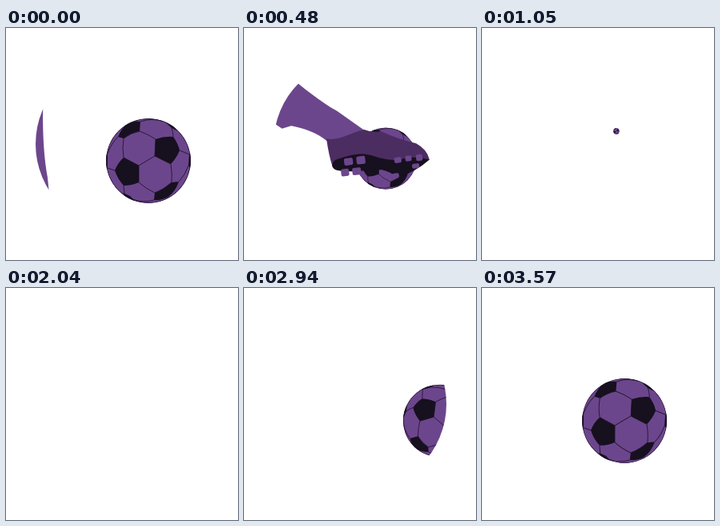
These frames come from a looping animation (290 px wide and 290 px high, 3.6 s). An HTML page:

```html
<!DOCTYPE html>
<html>
<head>
<meta charset="utf-8">
<style>
html, body { margin: 0; width: 100%; height: 100%; overflow: hidden; background: #fff; }
svg { display: block; width: 100vw; height: 100vh; }
.light { fill: #6c468c; }
.boot { fill: #4c2d61; }
.dark { fill: #17101f; }
.seam { fill: none; stroke: #2a1a38; stroke-width: 1; }
</style>
</head>
<body>
<svg viewBox="0 0 290 290">
  <clipPath id="stage"><circle cx="145" cy="145" r="108"/></clipPath>
  <clipPath id="round"><circle cx="178" cy="166" r="53"/></clipPath>
  <g clip-path="url(#stage)">
    <g id="ball"><g clip-path="url(#round)">
      <circle class="light" cx="178" cy="166" r="53"/>
      <path class="seam" d="M147 138Q156 131 167 129Q178 133 187 139L186 160L166 172L147 162Q145 150 147 138
        M186 160L206 170Q208 182 207 193Q197 202 186 206Q175 201 166 193V172
        M217 153L229 158M209 136Q209 130 207 125M136 178L127 175M147 197L148 207
        M140 136Q131 145 127 157M216 192Q224 184 228 172M168 117Q183 112 198 117M185 215Q172 219 158 214"/>
      <path class="dark" d="M187 139Q198 135 209 136Q215 144 217 153Q213 163 206 170L186 160Z
        M147 162L166 172V193Q157 197 147 197Q139 188 136 178Q140 168 147 162Z
        M140 136Q144 126 152 119Q160 116 168 117L167 129Q156 131 147 138Z
        M186 206Q197 202 207 193L216 192Q212 204 203 211Q194 216 185 215Z
        M229 158L232 154V178L228 172Z M124 158L127 157V175L124 178Z
        M196 115L207 119L215 129L207 125Z M146 206L155 210L163 218L149 213Z"/>
      <circle class="seam" cx="178" cy="166" r="52.7"/>
    </g></g>
    <g id="leg">
      <path class="light" d="M40 50L57 83C68 104 82 128 97 147L120 182L122 194H74L72 178C64 163 50 151 37 143L25 142L18 132L-10 125V50Z"/>
      <path class="boot" d="M72 174C84 183 104 178 120 181Q127 188 139 191Q154 207 174 221Q184 233 182 246L150 246L66 210Q67 194 72 174Z"/>
      <path class="dark" d="M66 209Q68 202 76 203C92 204 106 206 116 214C130 226 142 233 155 233Q170 237 182 246Q160 254 136 252Q131 242 122 236C110 230 86 226 72 217Q66 214 66 209Z"/>
      <g id="studs" class="light"></g>
    </g>
  </g>
</svg>
<script>
const LOOP = 3600, DEG = Math.PI / 180;
const ball = document.getElementById('ball'), leg = document.getElementById('leg');

// x, y, width, height of each stud on the sole
const studs = [[87, 211, 11, 9], [102, 215, 11, 10], [78, 222, 10, 9], [92, 226, 11, 9],
  [145, 232, 9, 7], [158, 235, 8, 7], [171, 239, 8, 8], [135, 249, 9, 6], [163, 247, 9, 6]];
document.getElementById('studs').innerHTML = studs.map(([x, y, w, h]) =>
  `<rect x="${x - w / 2}" y="${y - h / 2}" width="${w}" height="${h}" rx="2" transform="rotate(15 ${x} ${y}) skewX(0)"/>`).join('');

// time and radius of the ball as it flies away
const flight = [[430, 53], [570, 22.3], [630, 18.5], [1050, 4], [1650, 1.5], [2030, 0.6]];

function flightRadius(t) {
  if (t <= flight[0][0]) return flight[0][1];
  const i = flight.findIndex(([time]) => time >= t);
  if (i < 0) return 0;
  const [t0, r0] = flight[i - 1], [t1, r1] = flight[i];
  return r0 * (r1 / r0) ** ((t - t0) / (t1 - t0));
}

function placeBall(x, y, r, angle) {
  ball.style.display = r > 0 ? '' : 'none';
  ball.setAttribute('transform',
    `translate(${x} ${y}) rotate(${angle}) scale(${r / 53}) translate(-178 -166)`);
}

function draw(t) {
  leg.style.display = t < 760 ? '' : 'none';
  leg.setAttribute('transform', `rotate(${27.6 - 2.13e-4 * t * t} -6 75)`);
  if (t < 2300) {
    const away = Math.max(0, t - 432);
    placeBall(178 - 0.0163 * away, 166 - 0.0598 * away, flightRadius(t), 0);
  } else {
    const left = Math.max(0, 3585 - t) / 375, roll = left ** 1.7;
    placeBall(178 + 26.4 * roll, 166, Math.max(0, 53 - 2.1 * left ** 2.4), 100 * roll);
  }
}

const start = performance.now();
function tick() {
  draw((performance.now() - start) % LOOP);
  requestAnimationFrame(tick);
}
draw(0);
requestAnimationFrame(tick);
</script>
</body>
</html>
```
